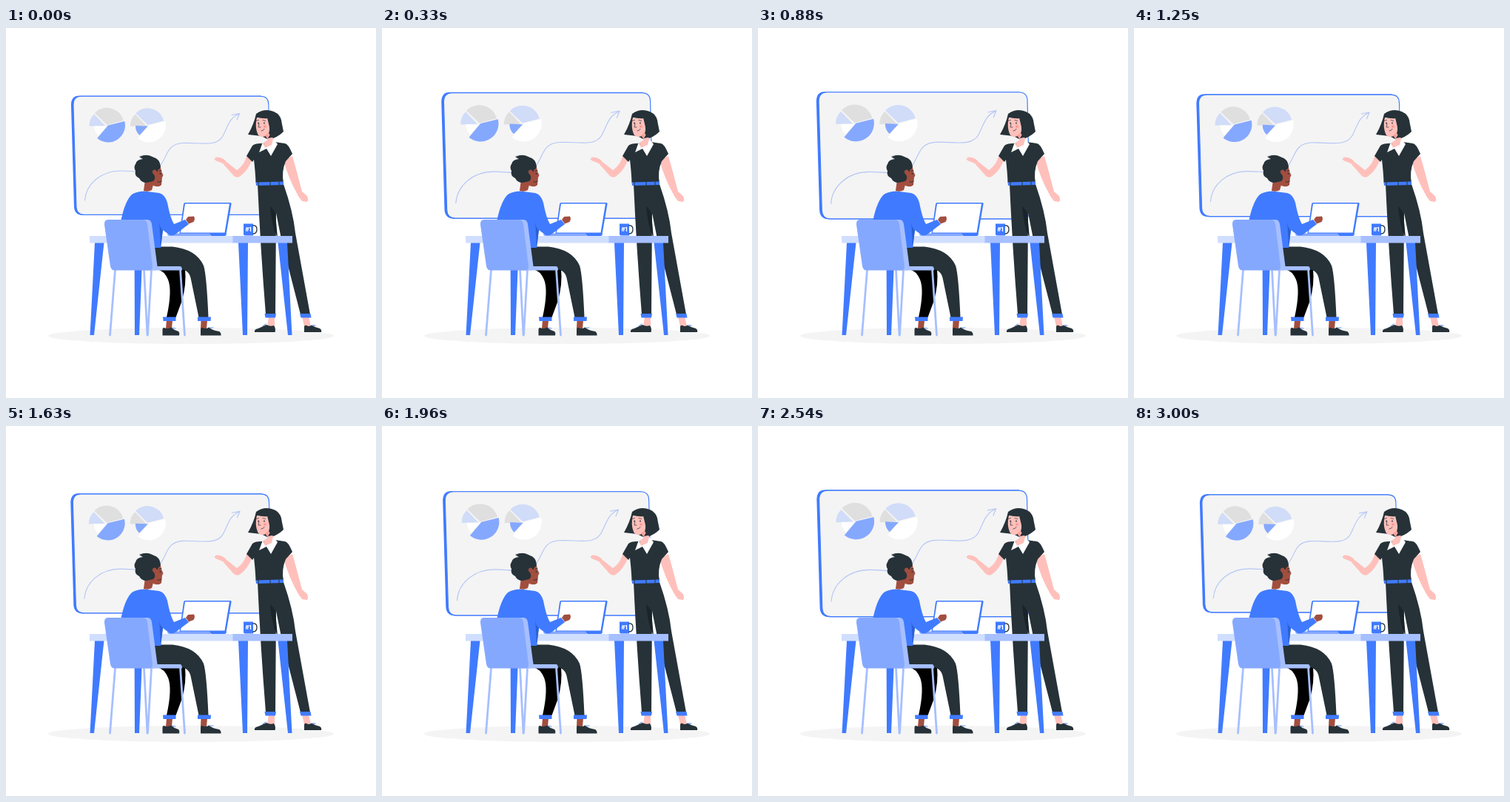
An HTML page that plays this animation: 500 by 500 pixels, repeating every 3040 ms.

```html
<!DOCTYPE html>
<html lang="en">
<head>
<meta charset="utf-8">
<title>Team presentation</title>
<style>
html, body { margin: 0; width: 100%; height: 100%; overflow: hidden; background: #fff; }
svg { display: block; width: 100vw; height: 100vh; }
.blue { fill: #407bff; }
.dark { fill: #263238; }
.pink { fill: #ffc0bb; }
.brown { fill: #a24e3f; }
.pale { fill: #a6bfff; }
.mist { fill: #d0dcf8; }
.grey { fill: #dfdfdf; }
.mid { fill: #85a8ff; }
.white { fill: #fff; }
.line { fill: none; stroke-linecap: round; stroke-linejoin: round; }
</style>
</head>
<body>
<svg viewBox="0 0 500 500">
  <ellipse cx="250" cy="416" rx="193" ry="11" fill="#f4f4f4"/>

  <g id="board">
    <path class="blue" d="M99 91.5H345V253H104Q93 253 92 242L88 104Q88 91.5 99 91.5Z"/>
    <path d="M102 92.3H344Q354.6 92.3 354.8 103L358 242Q358 252.4 347 252.4H106Q95.500 252.400 95 242L91 104Q91 92.300 102 92.300Z" fill="#f4f4f4" stroke="#407bff" stroke-width="1.1"/>
    <g id="pies"></g>
    <g class="line" stroke="#b5c7f5" stroke-width="1.100">
      <path d="M106.500 233C108 211 128 193 155 193C178 193 194 199 209 185C218 174 217 157 238 155.500C260 154 284 162 293 146C300 133 301 122 315 116"/>
      <path d="M305 117.500L315.500 115.500L312 124"/>
    </g>
  </g>

  <!-- standing presenter -->
  <g id="woman">
    <path class="pink" d="M326 171C323 182 318 188 312 192L298 181Q294 175 285 174.500Q280 176 283 179L293 183L308 200Q313 204 318 199Q327 192 332 179Z"/>
    <path class="pink" d="M375 179L387 173Q392 190 400 221L407 227Q409 232 407 235L400 234L395 227Q382 204 375 179Z"/>
    <path class="dark" d="M340 211H375Q388 248 391 277L411 387H398L373 290L365 250L364 387H351Q344 300 340 211Z"/>
    <path d="M357 240Q359 268 367 284L364 250Z" fill="#18232a"/>
    <path class="pink" d="M355 390H363V403H353ZM400 390H409L412 403H403Z"/>
    <path class="blue" d="M349.500 386H365L364 391.500H350.500ZM397 386H411.500L412.500 391.500H398.500Z"/>
    <path class="dark" d="M336 411Q335 407 341 406L352 401Q357 404 362 402Q365 406 363.500 411ZM403 411V404Q403 401 406 402Q410 404 413 401.500Q418 405 424 406Q427 408 426 411Z"/>
    <path class="line" d="M347 403L351 400M414 402L418 402" stroke="#407bff"/>
    <path class="dark" d="M344 156Q336 156 333 159L325 173L333 181L335 178Q337 195 337.500 209H375Q372 194 378 180L387 170Q381 156 377 156L363 154Z"/>
    <path class="blue" d="M337.500 208.500L375 207.500V212L338 213Z"/>
    <path d="M341 208V213M357 208V213M369 207.500V212" stroke="#263238"/>
    <path class="dark" d="M338 116Q349 108 362 113Q372 117 373 130L375 140Q367 148 355 151L345 146L327 144Q335 130 338 116Z"/>
    <path class="pink" d="M352 139L361 149L363 157Q355 162 349 163L348 155L354 151Z"/>
    <path class="pink" d="M339 121Q336 133 340 143Q343 149 351 146Q357 143 356 134L353 121Z"/>
    <path d="M350 145L355 142L354 151Z" fill="#ff9b98"/>
    <path class="dark" d="M337 120Q347 123 354 122L356 129Q361 138 354 149Q371 146 372 138L371 121L356 114Z"/>
    <path class="white" d="M347 154L342 168L352 163L358 173L367 157L361 150L359 158L350 162Z"/>
    <circle class="dark" cx="341" cy="128.500" r=".9"/>
    <circle class="dark" cx="349" cy="128.500" r=".9"/>
    <circle cx="350" cy="133" r="2" fill="#ff9b98"/>
    <path class="line" d="M338.500 125.500L341.500 124.500M347 124.500L350.500 125.500M342 129L341 134H344M345 139Q348 139 349 136.500" stroke="#263238" stroke-width=".7"/>
  </g>

  <!-- table -->
  <path class="blue" d="M120 290H132.500L119 415H113.500ZM173.500 290H185L180 415H174ZM314 290H327L326 415H320ZM367.500 290H380L386.500 415H381Z"/>
  <path fill="#d0deff" d="M113 281H307V290.500H113Z"/>
  <path class="pale" d="M306.500 281H387V290.500H306.500Z"/>

  <path class="blue" d="M242 236H303Q305 236 304.500 238L298 276Q297.500 279 295 279H236Q234 279 234.500 277L240 238Q240.500 236 242 236Z"/>
  <path class="white" d="M242 237.500H302L295.500 276.500H236Z"/>
  <path class="mid" d="M218 277.500H276V281H221Q218 281 218 277.500Z"/>
  <path class="blue" d="M275 277.500H298Q298 281 295 281H277Z"/>

  <path class="blue" d="M321 264.500H334V280.500H323Q321 280.500 321 278.500Z"/>
  <path class="line" d="M334 267Q339 266.500 339 272Q339 278 334 278" stroke="#263238" stroke-width="1.300"/>
  <text x="327.500" y="274.800" text-anchor="middle" class="white" style="font:800 7.500px Inter,sans-serif">#1</text>

  <!-- seated listener -->
  <g id="man">
    <path d="M204 326H242Q244 346 238 368L229.500 391H217Q225 355 219 340Q214 328 204 326Z"/>
    <path class="brown" d="M217 395H225L224 406H216ZM263.500 395H272L271 406H263Z"/>
    <path class="dark" d="M200 295.500H225Q257 299 267 321Q271 333 273.500 391H260.500L250 340Q248 327 236 326H200Z"/>
    <path class="blue" d="M212 390.500H229.500V396H212.500ZM259 390.500H277L276.500 396H259Z"/>
    <path class="dark" d="M211.500 415.500V407Q212 404 215 405.500Q219 407 223 404.500Q228 409 233 410Q235 412 234 415.500ZM263 415.500V406.500Q264 404 267 405.500Q271 407 274 404.500Q280 409 288 410Q291 412 290.500 415.500Z"/>
    <path class="line" d="M224 405L229 406M275 405L280 405" stroke="#407bff" stroke-width=".8"/>
    <path class="brown" d="M243 259L246 255L254 254.500Q256 258 253.500 262L247 264.500Z"/>
    <path class="blue" d="M187 220.500Q174 221 169 226Q160 236 155 262L198 297H209L212 273L220 279Q225 282 230 278L247 265L242 259L227 265Q222 257 218 236Q215 225 207 223Z"/>
    <path d="M207 258Q207 270 212 273L209 297Q208 279 207 258Z" fill="#2c60d8"/>
    <path class="brown" d="M188 205H201L197 219Q192 222 186 220Z"/>
    <path class="brown" d="M195 188H209Q209 192 212.500 199L211 202L210 212Q207 216 199 213L194 205Z"/>
    <path class="dark" d="M209 187Q208 177 199 174.500Q189 169 181 175L185 177Q176 178 175 184Q172 188 175 193Q173 200 180 203Q183 209 190 209L199 207Q203 203 200 198Q196 195 199 192Q203 190 204 195Q206 190 208 190Z"/>
    <path class="line" d="M181 174Q188 171 194 174" stroke="#263238" stroke-width="1.200"/>
    <path class="line" d="M207 193.500L210 192.500M205 208Q208 209 210 207" stroke="#263238" stroke-width=".9"/>
    <circle class="dark" cx="208.500" cy="197" r=".9"/>
  </g>

  <!-- chair -->
  <path class="line" d="M147.500 327L140.500 415M186.500 327L191 415M196.500 327L191.500 415M235.500 326L241.500 415" stroke="#a6bfff" stroke-width="2.800"/>
  <path class="pale" d="M195 322H235Q238 322 238 327.500H195Z"/>
  <path class="pale" d="M180 259H191Q196 259 197 265L204.500 322Q205 327.500 200 327.500H185Z"/>
  <path class="mid" d="M138 259H185Q190 259 191 265L198 322Q198 327.500 194 327.500H147Q142 327.500 141 322L133 266Q132.500 259 138 259Z"/>
</svg>
<script>
const LOOP = 3040;
const CENTER = [221, 172.5];
const REST = 1.013;
// [ms, scale] turning points of the board's pulse
const PULSE = [[0, 1.013], [330, 1.072], [610, 1.1], [880, 1.083], [1520, 1.01],
  [1630, 1.018], [2250, 1.092], [2340, 1.1], [2540, 1.079], [3040, 1]];

const board = document.getElementById("board");
const pies = document.getElementById("pies");

// Angles in degrees, clockwise from the right.
function slice(cx, cy, r, from, to, tone) {
  const at = deg => {
    const a = deg * Math.PI / 180;
    return `${cx + r * Math.cos(a)} ${cy + r * Math.sin(a)}`;
  };
  const path = document.createElementNS("http://www.w3.org/2000/svg", "path");
  path.setAttribute("class", tone);
  path.setAttribute("d", `M${cx} ${cy}L${at(from)}A${r} ${r} 0 ${+(to - from > 180)} 1 ${at(to)}Z`);
  pies.append(path);
}

slice(136.5, 131, 23, 224, 345, "grey");
slice(134, 132, 21.5, 178, 226, "mist");
slice(136.5, 133, 17, 133, 182, "white");
slice(138, 131.500, 23, -14, 130, "mid");

slice(191.500, 131, 22.500, 224, 345, "mist");
slice(189.500, 132, 21.500, 178, 226, "grey");
slice(192, 132.500, 17, 133, 182, "mid");
slice(193, 131.500, 23, -14, 130, "white");

function scaleAt(t) {
  const i = PULSE.findIndex(([end]) => t < end);
  const [t0, s0] = PULSE[i - 1], [t1, s1] = PULSE[i];
  return s0 + (s1 - s0) * (t - t0) / (t1 - t0);
}

function draw() {
  const [x, y] = CENTER;
  const s = scaleAt(performance.now() % LOOP) / REST;
  board.setAttribute("transform", `translate(${x} ${y}) scale(${s}) translate(${-x} ${-y})`);
  requestAnimationFrame(draw);
}
draw();
</script>
</body>
</html>
```
